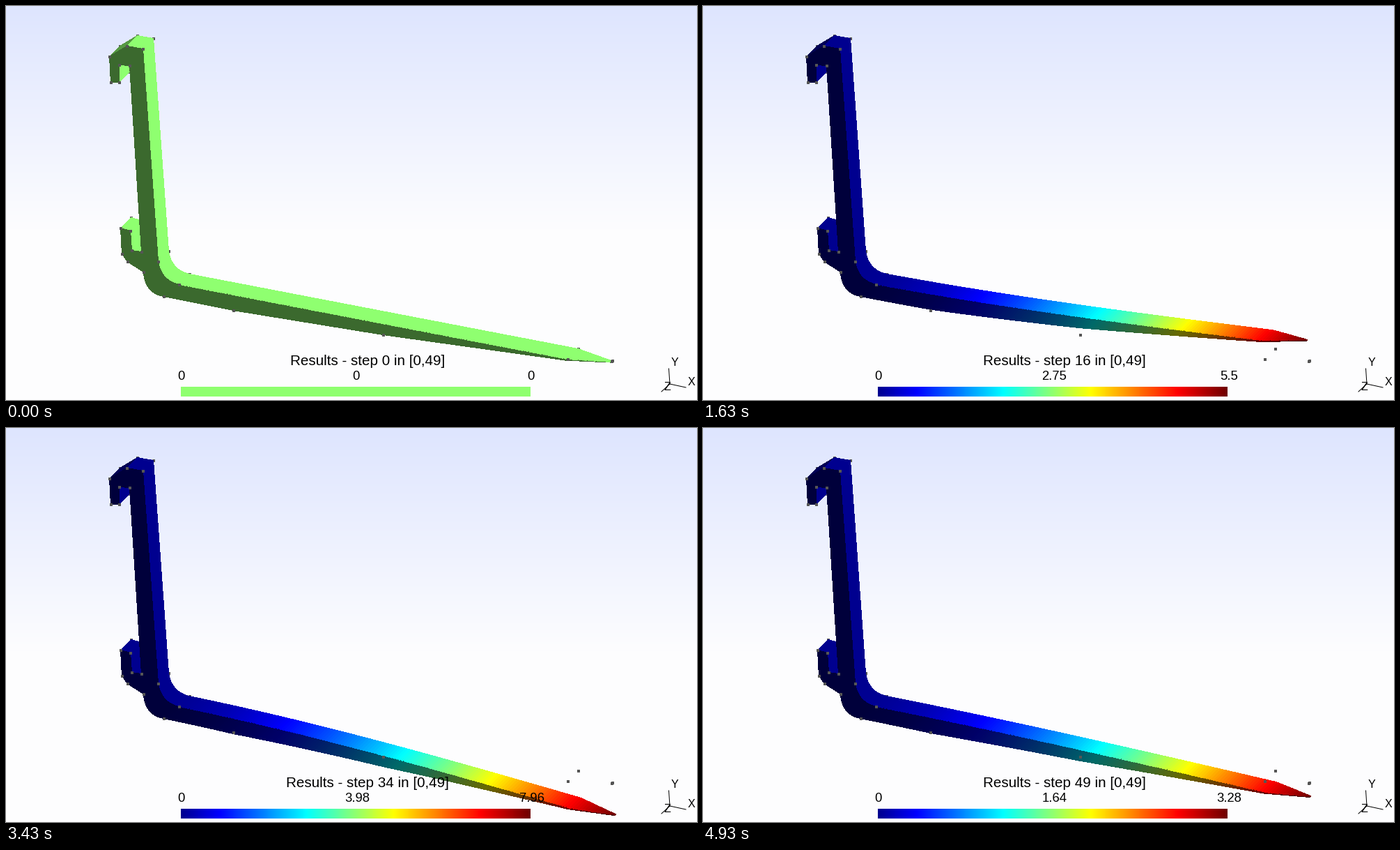
Recreate the animation shown at these times as a matplotlib script. Size 992 by 565 pixels, loop 5.03 s.

```python
import numpy as np
import matplotlib.pyplot as plt
from matplotlib.animation import FuncAnimation
from matplotlib.collections import PolyCollection

W, H, DPI = 992, 565, 100
STEPS, LOOP_MS = 50, 5030
RELEASE = 10                        # step at which the load is taken off
OMEGA = np.radians(45.4)            # swing per step
PX_PER_UNIT = 5.6
DEPTH = np.array([15, -15])         # screen offset from front to back side
ROOT_X, TIP_X, TAPER_X = 207, 862.5, 806
FRONT_SHADE, SLANT_SHADE = 0.41, 0.6

plt.rcParams["font.family"] = "Liberation Sans"
fig = plt.figure(figsize=(W / DPI, H / DPI), dpi=DPI)
ax = fig.add_axes([0, 0, 1, 1])
ax.set_axis_off()


def jet(t):
    t = np.asarray(t)[..., None] + 1 / 64
    return np.clip(1.5 - np.abs(4 * t - np.array([3, 2, 1])), 0, 1)


# ---------- motion ----------
def tip_displacement(step):
    """Ramped load, then a damped swing after the release. Up is positive."""
    if step <= RELEASE:
        return -1.356 * (step - np.sin(OMEGA * step) / OMEGA)
    t = step - RELEASE
    return -0.4 - 10.86 * np.exp(-0.0099 * t) * np.cos(OMEGA * t - np.radians(37.6))


def mode(x):
    """Bending line of a cantilever, 0 at the root and 1 at the tip."""
    s = np.clip((x - ROOT_X) / (TIP_X - ROOT_X), 0, 1)
    return s ** 2 * (3 - s) / 2


def project(points, tip=0):
    """Points are (x, y, z) with z from 0 (front) to 1 (back)."""
    drop = -tip * PX_PER_UNIT * mode(points[:, 0])
    bend = np.column_stack([0.1 * drop, drop])
    return points[:, :2] + points[:, 2:] * DEPTH + bend + 0.5


# ---------- profile, clockwise ----------
def curve(a, b, c, n=12):
    t = np.linspace(0, 1, n)[:, None]
    a, b, c = map(np.array, (a, b, c))
    return (1 - t) ** 2 * a + 2 * t * (1 - t) * b + t ** 2 * c


head = [(150, 109), (148, 72), (173, 57), (196, 61)]
inner_bend = curve((218, 366), (222, 393), (248, 399))
outer_bend = curve((226, 416), (199, 411), (197, 381))
lower_hook = [(174, 366), (166, 355), (164, 318), (178, 322), (180, 350), (194, 352)]
upper_hook = [(177, 85), (162, 84), (162, 109)]
underside = [(226, 416), (326, 436), (541, 471), (806, 508), (TIP_X, 517.5)]
post = np.vstack([head, inner_bend, outer_bend, lower_hook, upper_hook])

# ---------- faces ----------
faces, shades = [], []


def face(points, z, shade):
    faces.append(np.column_stack([points, np.broadcast_to(z, len(points))]))
    shades.append(shade)


def walls(outline):
    """Extrude the edges that look towards the viewer."""
    for a, b in zip(outline, np.roll(outline, -1, axis=0)):
        dx, dy = b - a
        in_bend = np.allclose(a, inner_bend[-1])
        if dx + dy > 0 and not in_bend:
            face([a, b, b, a], [0, 0, 1, 1], SLANT_SHADE if dy < 0 else 1)


def blade(n=160):
    x = np.linspace(248, TIP_X, n)
    ridge = np.column_stack([x, np.interp(x, [248, TIP_X], [399, 517])])
    x_low = np.linspace(226, TIP_X, n)
    low = np.column_stack([x_low, np.interp(x_low, *zip(*underside))])
    near = np.interp(x, [TAPER_X, TIP_X], [0, 0.46])
    for i in range(n - 1):
        j = i + 1
        face([ridge[i], ridge[j], low[j], low[i]],
             near[[i, j, j, i]], FRONT_SHADE)
        face([ridge[i], ridge[j], ridge[j], ridge[i]],
             [near[i], near[j], 1 - near[j], 1 - near[i]], 1)


walls(post)
face(post, 0, FRONT_SHADE)
blade()
shades = np.array(shades)[:, None]
levels = np.array([mode(f[:, 0].mean()) for f in faces])

# ---------- stage ----------
fade = np.clip(np.arange(H) / 320, 0, 1)[:, None, None]
sky = (1 - fade) * np.array([222, 229, 255]) + fade * np.array([253, 253, 254])
ax.imshow(sky / 255, extent=(0, W, H, 0), aspect="auto", zorder=0)

body = PolyCollection([project(f) for f in faces], edgecolors="none",
                      antialiaseds=False, zorder=2)
ax.add_collection(body)

# corner dots stay at the unloaded position
corners = np.vstack([head, inner_bend[[0, -1]], [(TAPER_X, 506)], underside[:3],
                     outer_bend[-1:], lower_hook, upper_hook])
for z, apex_z, order in ((0, 0.46, 3), (1, 0.54, 1)):
    dots = np.column_stack([corners, np.full(len(corners), z)])
    dots = project(np.vstack([dots, (TIP_X, 516.5, apex_z)]))
    ax.scatter(*dots.T, s=7, marker="s", c="#555555", linewidths=0, zorder=order)

bar = ax.imshow(np.zeros((1, 256, 3)), extent=(251, 753, 560, 546),
                aspect="auto", interpolation="nearest", zorder=4)
scale = np.linspace(0, 1, 256)[None, :]


def label(x, y, px, text=""):
    return ax.text(x, y, text, size=px * 72 / DPI, ha="center",
                   va="baseline", color="black", zorder=5)


title = label(519, 515, 20.7)
ticks = [label(251 * (i + 1), 536.5, 18.5) for i in range(3)]

for name, end, spot in (("Y", (951.5, 520), (960, 515.5)),
                        ("X", (976, 547), (984, 543.5)),
                        ("Z", (941, 553), (949.5, 551))):
    ax.plot([953, end[0]], [542, end[1]], color="black", lw=0.72, zorder=5)
    label(*spot, 16, name)

ax.set_xlim(0, W)
ax.set_ylim(H, 0)


def update(step):
    tip = tip_displacement(step)
    loaded = step > 0               # without a load every value is mid-scale
    body.set_verts([project(f, tip) for f in faces])
    body.set_facecolor(jet(levels if loaded else 0 * levels + 0.5) * shades)
    bar.set_data(jet(scale if loaded else 0 * scale + 0.5))

    title.set_text(f"Results - step {step} in [0,49]")
    for i, tick in enumerate(ticks):
        tick.set_text(f"{abs(tip) * i / 2:.3g}")
        tick.set_x(251 * (i + 1) + (2.5 if loaded and i else 0))
    return [body, bar, title, *ticks]


anim = FuncAnimation(fig, update, frames=STEPS, interval=LOOP_MS / STEPS,
                     repeat=True, repeat_delay=0, blit=False)
plt.show()
```
